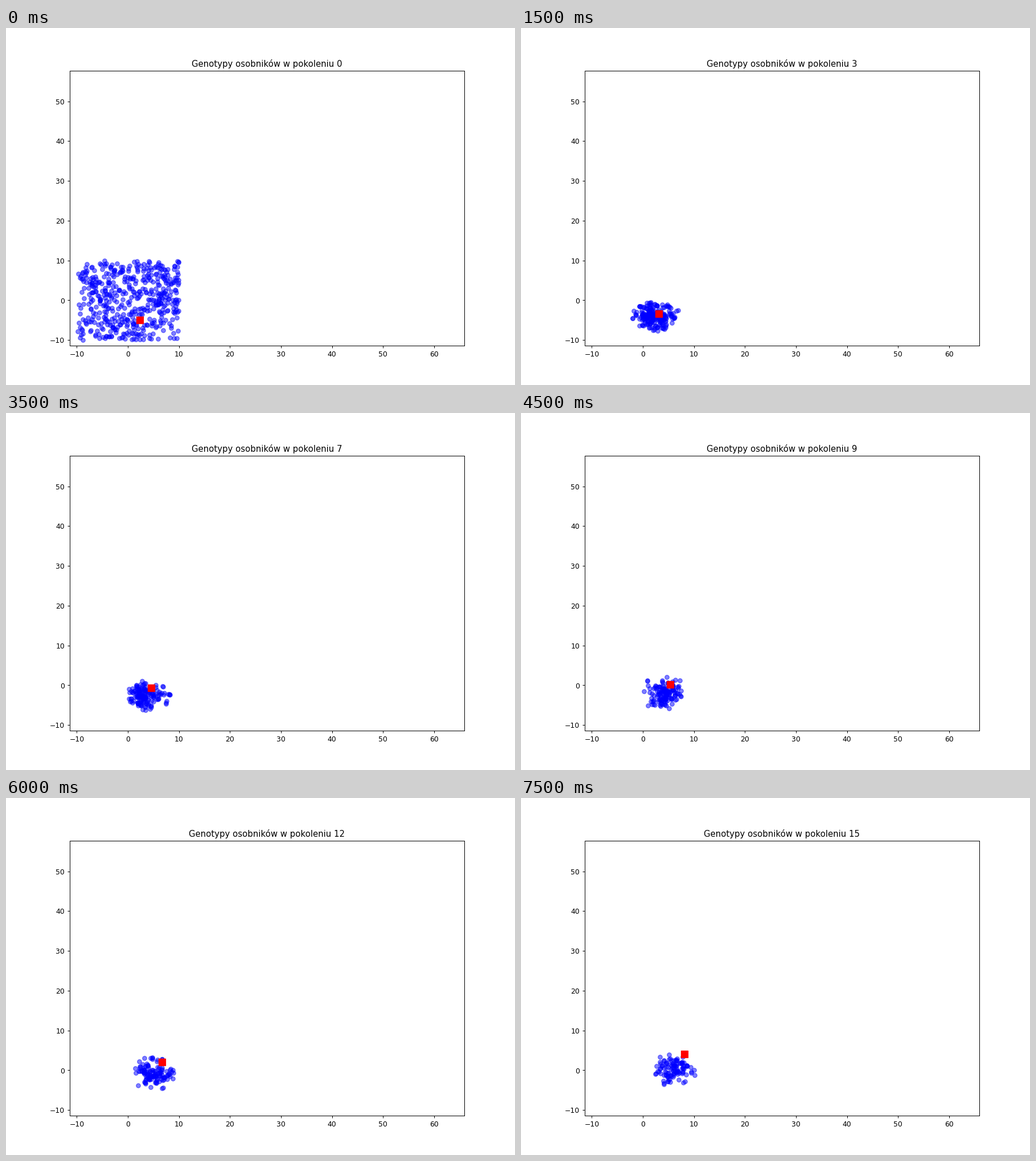
Recreate the animation shown at these times as a matplotlib script. Size 894 px wide and 626 px high, loop 8000 ms.

```python
import numpy as np
import matplotlib.pyplot as plt
from matplotlib.animation import FuncAnimation

DPI = 89.4
GENERATIONS = 16
STEP_MS = 500

# Key points of the drifting optimum
KEY_GEN = (0, 3, 5, 10, 15)
KEY_X = (2.28, 3.06, 3.84, 5.74, 8.08)
KEY_Y = (-5.0, -3.4, -1.5, 0.7, 4.15)


def optimum(gen):
    return np.interp(gen, KEY_GEN, KEY_X), np.interp(gen, KEY_GEN, KEY_Y)


def population(gen):
    """Uniform start, then a thinning cloud that trails the optimum."""
    rng = np.random.default_rng(100 + gen)
    if gen == 0:
        return rng.uniform(-10, 10, (500, 2))
    center = (1.45 + 0.3 * gen, -5.2 + 0.37 * gen)
    size = int(100 + 190 * np.exp(-gen / 6))
    unit = rng.normal(size=(2 * size, 2))
    unit = unit[np.hypot(*unit.T) < 2.5]
    parents = center + unit[:size * 3 // 4] * (1.95, 1.75)
    children = rng.choice(parents, size // 4)
    children = children + rng.normal(0, 0.2, children.shape)
    return np.vstack([parents, children])


fig, ax = plt.subplots(figsize=(10, 7.0023), dpi=DPI)
ax.set_xlim(-11.42, 65.87)
ax.set_ylim(-11.41, 57.65)
dots = ax.scatter([], [], color="blue", alpha=0.5)
goal = ax.scatter([], [], color="red", marker="s", s=100, zorder=3)
title = ax.set_title("")


def draw(gen):
    dots.set_offsets(population(gen))
    goal.set_offsets([optimum(gen)])
    title.set_text(f"Genotypy osobników w pokoleniu {gen}")
    return dots, goal, title


anim = FuncAnimation(fig, draw, frames=GENERATIONS, interval=STEP_MS,
                     repeat=True, repeat_delay=0)
plt.show()
```
